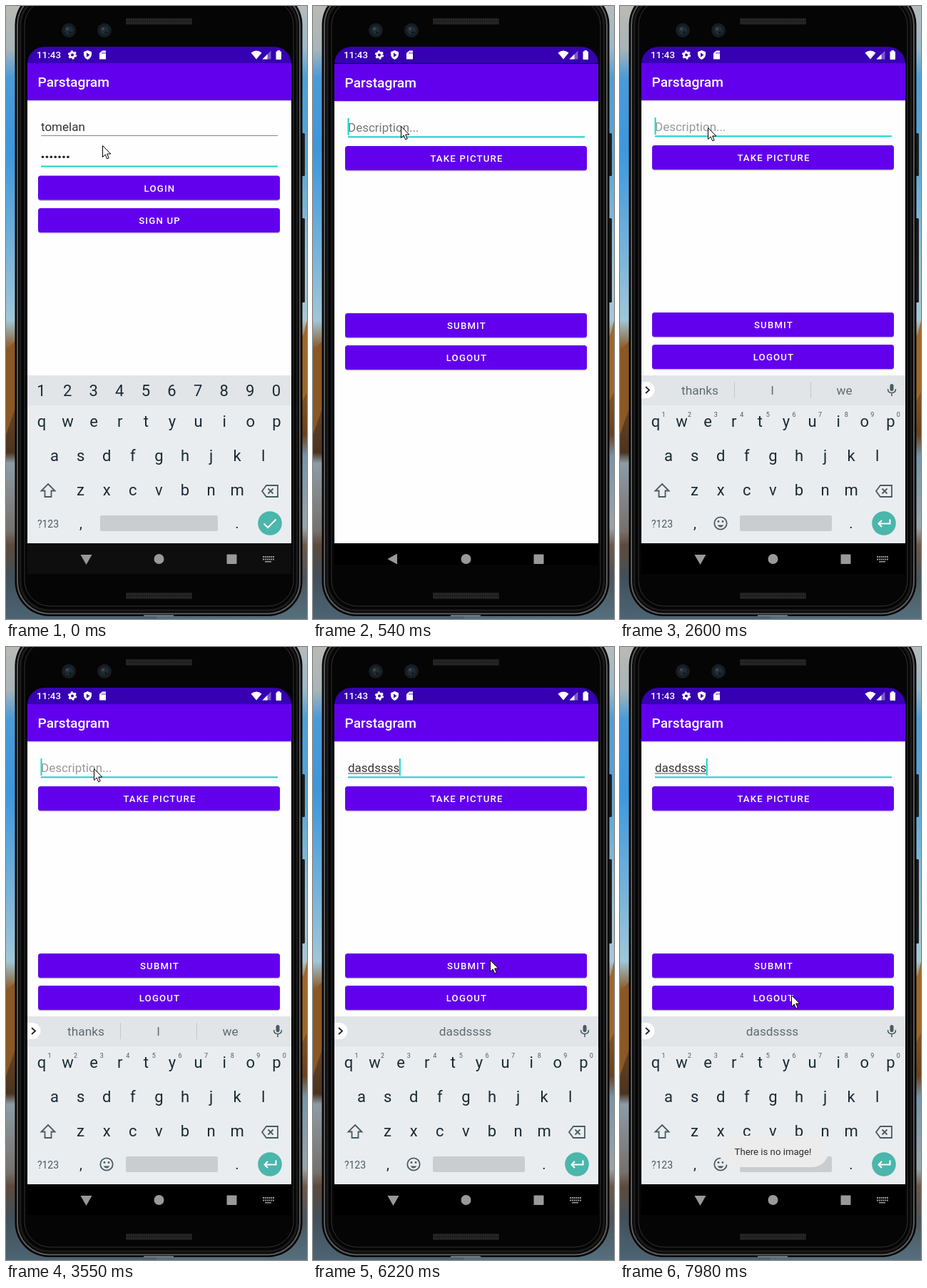
Recreate the animation shown at these times as an HTML page. Size 422 by 858 pixels, loop 8000 ms.

```html
<!DOCTYPE html>
<html lang="en">
<head>
<meta charset="utf-8">
<title>Sign in and post</title>
<style>
html, body { margin: 0; width: 100%; height: 100%; overflow: hidden; background: #000; }
svg { display: block; width: 422px; height: 858px; font-family: Roboto, "Open Sans", sans-serif; }
.mid { text-anchor: middle; }
.line { fill: none; stroke: #4b5a62; stroke-width: 1.8; }
</style>
</head>
<body>
<script>
const LOOP = 8000;
const PURPLE = '#6200ee', TEAL = '#16d5c8', INK = '#1b2b33', GREY = '#4b5a62';

const rect = (x, y, w, h, fill, extra = '') =>
  `<rect x="${x}" y="${y}" width="${w}" height="${h}" fill="${fill}" ${extra}/>`;
const text = (x, y, s, size, fill, extra = 'class="mid"') =>
  `<text x="${x}" y="${y}" font-size="${size}" fill="${fill}" ${extra}>${s}</text>`;
const path = (d, extra) => `<path d="${d}" ${extra}/>`;
const circle = (x, y, r, fill, extra = '') =>
  `<circle cx="${x}" cy="${y}" r="${r}" fill="${fill}" ${extra}/>`;
const group = (id, body) => `<g id="${id}">${body}</g>`;
const keys = (s, x, y, size = 22, fill = INK) =>
  [...s].map((c, i) => text(x + 36.6 * i, y, c, size, fill)).join('');
const gradient = (id, stops) =>
  `<linearGradient id="${id}" x2="0" y2="858" gradientUnits="userSpaceOnUse">` +
  stops.map(([y, c]) => `<stop offset="${y / 858}" stop-color="${c}"/>`).join('') + '</linearGradient>';
const button = (y, label) =>
  rect(45, y + 1, 339, 34.5, '#000', 'rx="4" opacity=".22"') +
  rect(45, y, 339, 34, PURPLE, 'rx="3.5"') +
  text(215.5, y + 22, label, 13.2, '#fff', 'class="mid" font-weight="500" letter-spacing="1.18"');

const scenery =
  rect(0, 0, 211, 858, 'url(#left)') + rect(211, 0, 211, 858, 'url(#right)') +
  path('M0 492L6 476L14 468V560L0 600Z', 'fill="#8a5824"') +
  path('M422 440L418 458L412 468V560L422 540Z', 'fill="#a0672b"');

const phone =
  rect(414, 178, 5, 60, '#1c1c1c', 'rx="1.5"') + rect(414, 297, 5, 118, '#1c1c1c', 'rx="1.5"') +
  rect(12.5, -22, 403, 876, '#050505', 'rx="48"') +
  rect(16, -18.5, 396, 869, 'none', 'rx="45" stroke="#5a5a5a" stroke-width="2"') +
  rect(20, -14, 388, 860, 'none', 'rx="41" stroke="#1b1b1b" stroke-width="3"') +
  rect(26, -9, 377, 849, '#050505', 'rx="36" stroke="#333"') +
  [17, 821].map(y => rect(168, y, 93, 9, '#1d1d1d', 'rx="1"') +
    path(`M169 ${y + 2.5}H260M169 ${y + 6.5}H260`, 'stroke="#2c2c2c" stroke-width="2" stroke-dasharray="2 1"')).join('') +
  [88, 138].map(x => circle(x, 34, 10, '#171d22') + circle(x, 34, 6, '#1f2c34') +
    circle(x - 2, 32, 2, '#3b4b55') + circle(x + 2, 37, 1.5, '#0a1015')).join('') +
  rect(193, 852.5, 42, 1.5, '#8b8b8b');

const statusBar =
  rect(30, 57, 370, 23, '#3700b3') +
  text(43, 73, '11:43', 13.4, '#fff', 'font-weight="500"') +
  circle(93, 68.5, 3.4, 'none', 'stroke="#fff" stroke-width="2.8"') +
  circle(93, 68.5, 5.3, 'none', 'stroke="#fff" stroke-width="1.8" stroke-dasharray="2.8 2.75"') +
  path('M114.5 62L120 64.3V68Q119.5 73 114.5 75Q109.5 73 109 68V64.3ZM113 65.5V71.5L117.5 68.5Z',
    'fill="#fff" fill-rule="evenodd"') +
  path('M131 66L135 62.5H140V74.5H131Z', 'fill="#fff"') +
  path('M135 64.5V67M137 64.5V67M139 64.5V67', 'stroke="#3700b3" stroke-width=".8"') +
  path('M343.5 65.5Q351 59.5 358.5 65.5L351 74.5Z', 'fill="#fff"') +
  path('M371.5 62.5V74.5H359.5Z', 'fill="#fff" opacity=".35"') +
  path('M366.5 67.5V74.5H359.5Z', 'fill="#fff"') +
  rect(378.5, 63.5, 7.5, 11.5, '#fff', 'rx="1"') + rect(380.5, 62, 3.5, 2, '#fff');

const login =
  text(49, 175, 'tomelan', 17, '#333', '') + rect(49, 181, 332, 1, '#858585') +
  [...'.......'].map((_, i) => circle(51.5 + 5.9 * i, 211.3, 1.8, '#222')).join('') +
  rect(49, 223.5, 332, 2, TEAL) +
  rect(88.5, 198, 2, 24, TEAL, 'id="passCaret"') +
  button(237.5, 'LOGIN') + button(283, 'SIGN UP');

const post =
  text(49, 175, 'Description...', 17, '#999', 'id="hint"') +
  text(49, 175, '', 17, '#333', 'id="typed"') +
  rect(49, 176.5, 0, 1, '#444', 'id="under"') +
  rect(49, 181.3, 332, 2, TEAL) +
  rect(48.5, 156, 2, 24, TEAL, 'id="caret"') +
  button(195, 'TAKE PICTURE') + button(429, 'SUBMIT') +
  rect(45, 429, 339, 34, '#fff', 'rx="3.5" id="ripple"') +
  button(474, 'LOGOUT');

const app =
  rect(30, 80, 370, 672, '#fefefe') +
  rect(30, 132, 370, 2, 'url(#shade)') + rect(30, 80, 370, 52, PURPLE) +
  text(44.5, 113, 'Parstagram', 19.2, '#fff', 'font-weight="500"') +
  group('login', login) + group('post', post);

const suggestions =
  path('M30 526H37A11.5 11.5 0 0 1 37 549H30Z', 'fill="#fff"') +
  path('M36 533L41 537.5L36 542', 'class="line" style="stroke:#222"') +
  path('M160.5 526V549M267.5 526V549', 'id="dividers" stroke="#c3c8cc"') +
  [112, 213.5, 314.5].map((x, i) => text(x, 544, '', 17.3, '#606b71', `class="mid" id="word${i}"`)).join('') +
  rect(378.5, 529, 5, 10, GREY, 'rx="2.5"') +
  path('M375.5 536Q375.5 541.5 381 541.5T386.5 536M381 541.5V546', 'class="line" style="stroke-width:1.5"') +
  keys('1234567890', 61, 574.5, 9, GREY) +
  circle(141, 724, 8.7, 'none', 'class="line"') +
  circle(138, 721.5, 1.4, GREY) + circle(144, 721.5, 1.4, GREY) +
  path('M136.5 726.5Q141 732.5 145.5 726.5Z', `fill="${GREY}"`) +
  rect(168, 713, 129, 22, '#c9cdd0', 'rx="2"');

const numbers = keys('1234567890', 49.5, 546) + rect(132, 713, 165, 22, '#c9cdd0', 'rx="2"');

const keyboard =
  rect(30, 517, 370, 235, '#e9edf0') + rect(30, 517, 370, 42, '#e1e5e8') +
  keys('qwertyuiop', 50, 589) + keys('asdfghjkl', 68, 637) + keys('zxcvbnm', 104.5, 684.5) +
  path('M59 669L68.5 678.5H63.5V687H54.5V678.5H49.5Z', 'class="line"') +
  path('M365 671H381V687H365L359 679Z', 'class="line"') +
  path('M367.5 675.5L374.5 682.5M374.5 675.5L367.5 682.5', 'class="line"') +
  text(59, 729.5, '?123', 14, GREY) + text(105, 731, ',', 20, INK) + text(324, 731, '.', 20, INK) +
  group('numbers', numbers) + group('suggestions', suggestions) +
  circle(370, 724, 16.8, '#4bb6ab') +
  path('M361.5 724.5L367 730L378.5 718.5', 'id="check" fill="none" stroke="#fff" stroke-width="2"') +
  path('M378.5 718.5V724.5H362.5M367 720L362.5 724.5L367 729', 'id="enter" fill="none" stroke="#fff" stroke-width="2"');

const nav =
  rect(30, 752, 370, 43, '#000', 'id="navBar"') +
  path('M104.5 768H120.5L112.5 782Z', 'id="down" fill="#999"') +
  path('M104.5 774L118 766.5V781.5Z', 'id="back" fill="#999"') +
  circle(214.5, 774, 7, '#999') + rect(309.5, 767.5, 14, 13.5, '#999', 'rx="1"') +
  group('kbIcon', path('M360 771H376M360 774.5H376', 'stroke="#999" stroke-width="2" stroke-dasharray="2 .8"') +
    rect(363, 777, 9, 1.5, '#999'));

const toast =
  rect(139, 684, 153, 44, '#ececec', 'rx="22"') + text(214.5, 711, 'There is no image!', 13.2, '#2b2b2b');

document.body.innerHTML = `<svg viewBox="0 0 422 858"><defs>` +
  gradient('left', [[0, '#b9bab4'], [60, '#a9b4b8'], [100, '#4a9bd8'], [200, '#3c97dd'], [300, '#64abdc'],
    [440, '#a0c6d8'], [480, '#8a5824'], [560, '#6b4420'], [625, '#4a3420'], [640, '#8d9ca6'],
    [735, '#76706c'], [755, '#5d4a3c'], [800, '#42505a'], [858, '#4c6474']]) +
  gradient('right', [[0, '#b4bcbd'], [60, '#9cb9c8'], [100, '#4f9fd6'], [220, '#5aa6d8'], [330, '#8fbfd6'],
    [440, '#a9c8d6'], [470, '#a0672b'], [600, '#6b431e'], [630, '#7895a8'], [730, '#9aa5aa'],
    [755, '#70584a'], [800, '#4c565c'], [858, '#55707f']]) +
  `<linearGradient id="shade" x2="0" y2="1"><stop stop-color="#c4c4c4"/><stop offset="1" stop-color="#fefefe"/></linearGradient>
  <clipPath id="screen"><path d="M30 752V81A24 24 0 0 1 54 57H376A24 24 0 0 1 400 81V752Z"/></clipPath></defs>` +
  scenery + phone + nav +
  `<g clip-path="url(#screen)">${group('app', app)}${statusBar}${group('keyboard', keyboard)}</g>` +
  group('toast', toast) +
  path('M.5 .5V16.5L4.2 13L6.7 18.8L9.2 17.7L6.7 12H11.8Z',
    'id="mouse" fill="#fff" stroke="#000" stroke-width="1" stroke-linejoin="round"') + '</svg>';

// Each track lists [time, value]; a value holds until the next entry.
const tracks = {
  mouse: [[0, [135, 195]], [150, [131, 186]], [270, [125, 173]], [390, [123, 169]], [540, [123, 168]],
    [660, [123, 170]], [4750, [123, 171]], [5290, [170, 262]], [5410, [220, 348]], [5560, [246, 429]],
    [5980, [258, 433]], [6100, [252, 436]], [6220, [248, 438]], [7010, [247, 452]], [7130, [244, 472]],
    [7250, [241, 487]], [7400, [240, 487]]],
  typed: [[0, 0], [4900, 1], [5020, 2], [5170, 3], [5290, 4], [5410, 5], [5830, 6], [5980, 7], [6100, 8]],
  words: [[0, 'thanks,I,we'], [4900, 'd,do,did'], [5020, 'da,day,days'], [5170, 'das,dad,day'],
    [5290, 'dasd,dad,said'], [5410, 'dasds,dads,'], [5830, ',dasdss,'], [5980, ',dasdsss,'], [6100, ',dasdssss,']],
  caret: [[0, 1], [1180, 0], [1580, 1], [2170, 0], [2600, 1], [3180, 0], [3550, 1], [4170, 0], [4600, 1],
    [6590, 0], [7130, 1], [7550, 0], [7980, 1]],
  passCaret: [[0, 0], [270, 1]],
  ripple: [[0, 0], [6590, .22], [6740, .12], [6860, 0]],
  toast: [[0, 0], [6740, .4], [6860, .85], [7010, 1]],
  lift: [[0, 0], [540, 235], [780, 90], [930, 0]]
};
const at = (name, t) => tracks[name].findLast(([time]) => time <= t)[1];
const el = id => document.getElementById(id);
const set = (id, name, value) => el(id).setAttribute(name, value);
const show = (id, on) => set(id, 'opacity', Number(on));
const move = (id, x, y) => set(id, 'transform', `translate(${x} ${y})`);

function draw() {
  const t = performance.now() % LOOP;
  const posting = t >= 540, opening = posting && t < 660, bare = posting && t < 930;

  for (const id of ['login', 'numbers', 'check']) show(id, !posting);
  for (const id of ['post', 'suggestions', 'enter']) show(id, posting);
  for (const id of ['down', 'kbIcon']) show(id, !bare);
  show('back', bare);
  set('navBar', 'height', bare ? 30 : 43);
  set('navBar', 'fill', posting ? '#000' : '#0e0e0e');
  move('app', 0, Number(opening));
  move('keyboard', 0, at('lift', t));
  move('mouse', ...at('mouse', t));
  for (const id of ['caret', 'passCaret', 'ripple', 'toast']) show(id, at(id, t));

  const typed = 'dasdssss'.slice(0, at('typed', t));
  el('typed').textContent = typed;
  const width = typed ? el('typed').getComputedTextLength() : 0;
  set('under', 'width', width);
  set('caret', 'x', 48.5 + width);
  show('hint', !typed);
  set('hint', 'fill', opening ? '#777' : '#999');

  const words = at('words', t).split(',');
  words.forEach((word, i) => el('word' + i).textContent = word);
  show('dividers', words[0] !== '');
  const bold = typed && words[0];
  set('word1', 'font-weight', bold ? 700 : 400);
  set('word1', 'fill', bold ? '#111' : '#606b71');
  requestAnimationFrame(draw);
}
draw();
</script>
</body>
</html>
```
